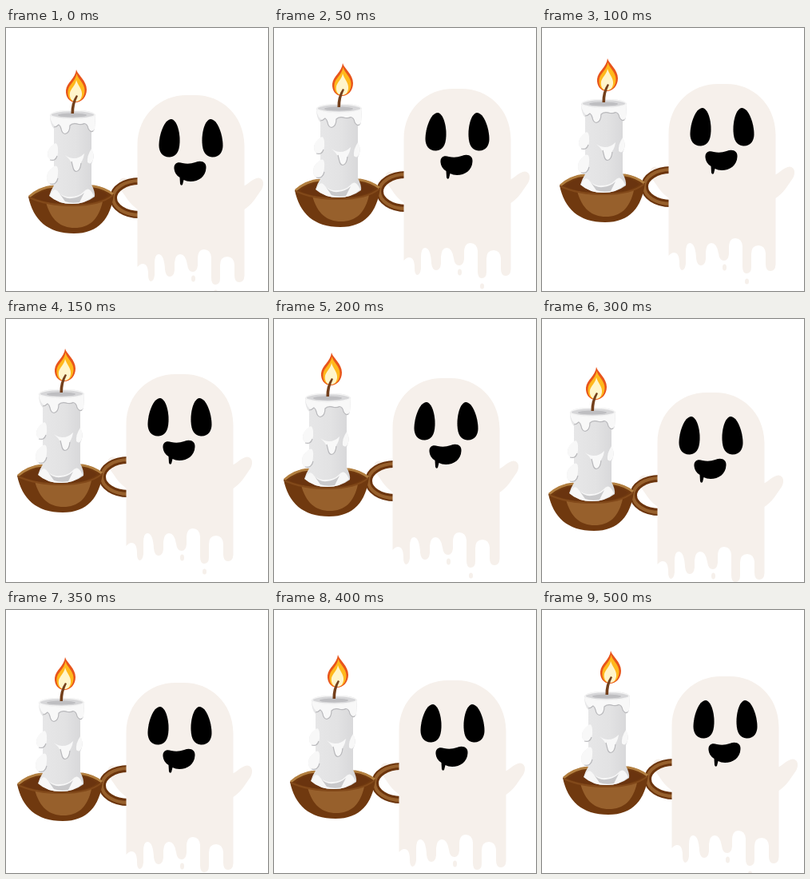
Write an HTML page that moves like this. It is 328 px wide and 329 px high and loops after 550 ms.

```html
<!DOCTYPE html>
<html lang="en">
<head>
<meta charset="utf-8">
<title>Ghost with candle</title>
<style>
  html, body { margin: 0; width: 100%; height: 100%; overflow: hidden; background: #fff; }
  svg { display: block; width: 328px; height: 329px; }
  .drift { animation: drift 550ms step-end infinite; }
  @keyframes drift {
    0% { transform: translate(0, 0); }
    9.0909% { transform: translate(-2px, -8px); }
    18.1818% { transform: translate(-6px, -14px); }
    27.2727% { transform: translate(-14px, -15px); }
    36.3636% { transform: translate(-16px, -10px); }
    45.4545% { transform: translate(-18px, -3px); }
    54.5454% { transform: translate(-20px, 8px); }
    63.6363% { transform: translate(-14px, 7px); }
    72.7272% { transform: translate(-8px, 4px); }
    81.8181% { transform: translate(-4px, 2px); }
    90.909% { transform: translate(-2px, -1px); }
  }
</style>
</head>
<body>
<svg viewBox="0 0 328 329">
  <defs>
    <linearGradient id="wax">
      <stop offset="0" stop-color="#e8e8e9"/>
      <stop offset=".6" stop-color="#e2e2e3"/>
      <stop offset="1" stop-color="#d6d6d8"/>
    </linearGradient>
    <path id="arm" d="M297 198C304 195 309 188 316 187.500C323 188 323.500 196 320 202L311 215Q305 223 297 228Z"/>
    <path id="eye" d="M207 114C214 115 218 130 217.500 143C217 155 213 161 205 161.500C196 162 191.500 155 191.500 147C191.500 134 198 114 207 114Z"/>
  </defs>
  <g class="drift">
    <!-- arms -->
    <g fill="#f6f0eb">
      <use href="#arm"/>
      <use href="#arm" transform="translate(463.500) scale(-1 1)"/>
    </g>

    <!-- holder -->
    <g fill="none">
      <ellipse cx="167" cy="212.500" rx="32.500" ry="21" stroke="#6b340c" stroke-width="9"/>
      <ellipse cx="167" cy="212.500" rx="33" ry="21.500" stroke="#97602c" stroke-width="4"/>
    </g>
    <path d="M28 211C37 203 47 198 60 197H110Q124 199 135 208C131 238 116 257 85 257C52 257 34 240 28 211Z" fill="#70390f"/>
    <path d="M29 211C38 203 47 199 60 198H110Q123 200 134 208" fill="none" stroke="#b27f40" stroke-width="3"/>
    <path d="M50 218Q86 226 121 217C116 240 104 250 86 250C68 250 56 240 50 218Z" fill="#97602c"/>
    <path d="M35 212Q44 203 62 201H108Q120 203 128 209C121 216 104 220 84 220C62 220 44 217 35 212Z" fill="#6a340f"/>
    <path d="M29 212C44 219 62 222 84 222C106 222 123 218 134 209" fill="none" stroke="#82491a" stroke-width="2"/>

    <!-- candle -->
    <path d="M55 109Q57 103 84 103Q110 103 112 109L111 126Q110 131 107 129V153Q111 157 109 165L107 170V196Q112 205 111 211Q99 220 83 220Q65 220 54 210Q56 203 60 197Q51 196 51 187Q51 179 60 174V166Q52 165 52 157Q53 150 60 147V126Q55 121 55 109Z" fill="url(#wax)"/>
    <path d="M55 210Q60 197 66 206Q72 212 81 211Q91 211 97 205Q104 196 110 210Q99 220 83 220Q65 220 55 210Z" fill="#f7f7f7"/>
    <path d="M67 207Q73 214 82 213Q92 212 98 206L92 218Q82 220 74 217Z" fill="#c9c9cb"/>
    <g fill="#f8f8f8">
      <path d="M60 145Q64 142 65 150Q66 163 60 166Q52 165 52 157Q53 149 60 145Z"/>
      <path d="M60 173Q66 170 65 182Q64 196 58 196Q51 195 51 187Q51 179 60 173Z"/>
      <path d="M107 151Q111 157 109 165Q106 172 102 168Q101 160 107 151Z"/>
      <path d="M74 159Q79 163 85 163Q92 163 98 157Q97 164 94 168Q93 179 88 179Q84 179 83 170Q80 164 74 159Z"/>
      <path d="M55 110Q84 119 112 109L111 126Q107 132 103 126Q102 119 97 119Q94 121 91 120Q84 117 80 121Q80 131 74 132Q69 131 69 124Q66 120 63 123Q57 122 55 110Z"/>
    </g>
    <g fill="none" stroke="#b9b9bc" stroke-width="1.200">
      <path d="M60 124Q63 124 66 121Q68 122 69 126Q70 132 74 132.500Q80 131 80 122Q84 118 91 120.500Q96 121 98 119.500Q102 120 103 126Q106 131 109 129"/>
      <path d="M82 167L84 175Q85 179 88 179.500Q93 179 94 169"/>
      <path d="M55 165Q62 167 64 160M55 195Q63 197 65 188"/>
    </g>
    <ellipse cx="83.500" cy="108.500" rx="27.500" ry="5" fill="#d6d6d8" stroke="#f4f4f4" stroke-width="1.500"/>
    <ellipse cx="83" cy="109" rx="18" ry="2.500" fill="#bebec1"/>

    <!-- flame -->
    <path d="M88 52C90 59 101 66 101 77C101 86 95 93 87 93C79 93 74.500 86 75 78C76 68 87 63 88 52Z" fill="#e8551c"/>
    <path d="M88.500 57C90 64 98.500 69 98.500 78C98.500 86 94 92 87 92C80 92 77 86 77.500 79C78 71 87 67 88.500 57Z" fill="#ffb81c"/>
    <path d="M88 65C90 72 96 77 95 84C94 90 91 92 87 92C82 92 79 87 80 81C81 76 87 72 88 65Z" fill="#fff5cb"/>
    <path d="M81.500 107Q81 94 88 84L90 85Q85 95 85 107Z" fill="#74401c"/>

    <!-- ghost -->
    <g fill="#f6f0eb">
      <path d="M164.500 147C164.500 108 194 84 226 84H237C269 84 298 108 298.500 147V310Q298 318 292 318Q286 318 286 309V296Q285 286 277 286Q268 286 268 297V313Q268 321 262 321Q257 321 257 312V287Q256 277 248 277Q240 277 240 289V297Q239 305 234 305Q228 305 227 296Q225 283 218 283Q212 283 211 294V303Q210 311 205 311Q200 311 199 302Q198 283 191 283Q186 283 186 295V309Q185 317 181 317Q178 316 178 308Q178 295 171 295Q168 295 164.500 299Z"/>
      <ellipse cx="234.500" cy="313.500" rx="2.500" ry="4"/>
      <ellipse cx="262.500" cy="331" rx="2.500" ry="3.500"/>
    </g>
    <use href="#eye"/>
    <use href="#eye" transform="translate(463) scale(-1 1)"/>
    <path d="M210.500 176C210 169 215 167 221 169Q229 171 237 168C245 165 251 168 250.500 175C250 186 241 192 231 192Q226 192 222.500 190L221 196Q219 198 218 195L217.500 187Q211 183 210.500 176Z"/>
  </g>
</svg>
</body>
</html>
```
